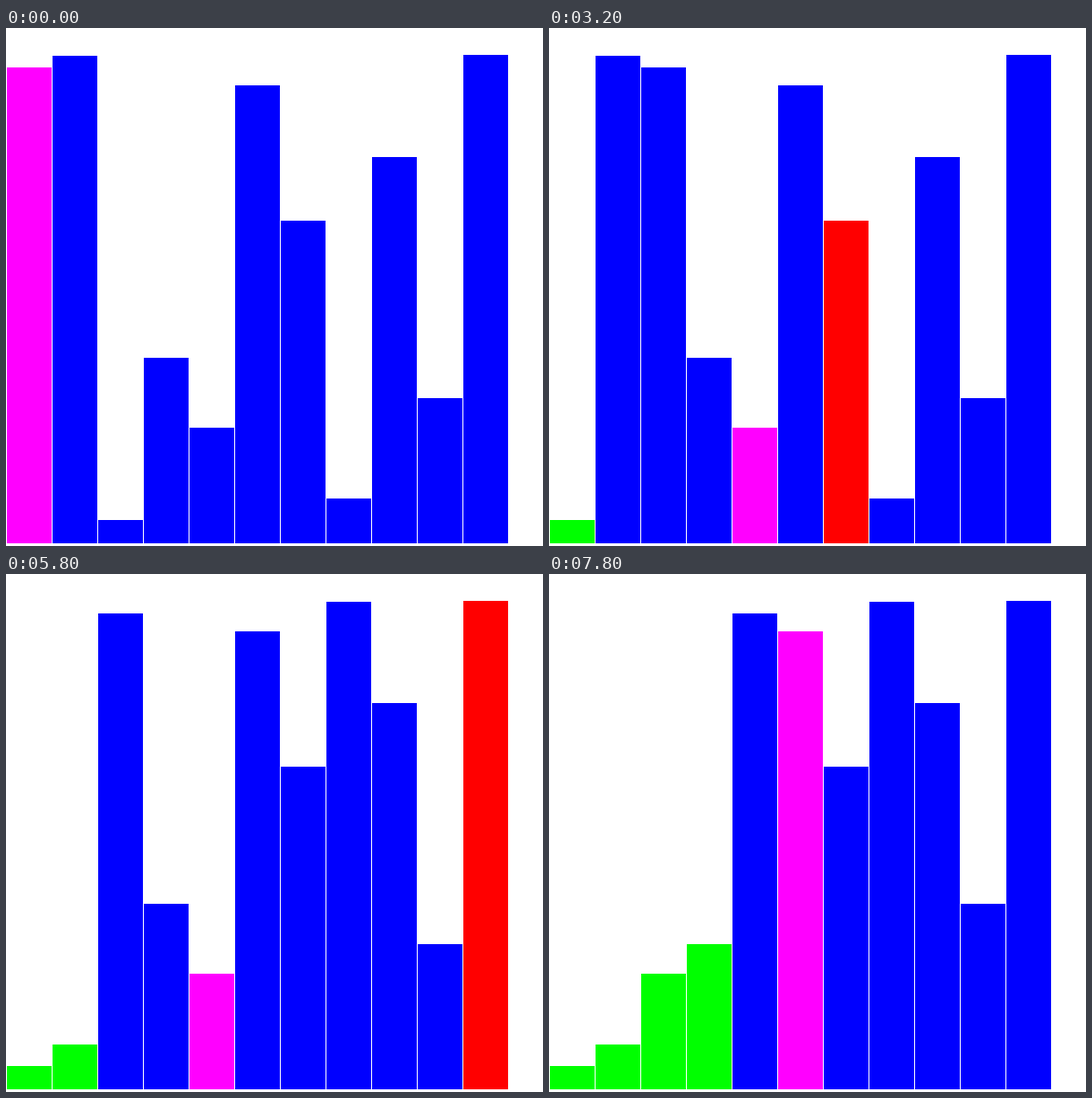
These frames come from a looping animation (600 by 578 pixels, 8000 ms). An HTML page with a canvas:

```html
<!DOCTYPE html>
<html lang="en">
<head>
<meta charset="utf-8">
<title>Selection sort</title>
<style>
  html, body { margin: 0; width: 100%; height: 100%; overflow: hidden; background: #fff; }
  canvas { display: block; }
</style>
</head>
<body>
<canvas id="stage" width="600" height="578"></canvas>
<script>
const ctx = document.getElementById('stage').getContext('2d');
const STEP_MS = 200, STEPS = 40;
const BASELINE = 575, BAR_WIDTH = 50, PITCH = 51;
const COLORS = { rest: '#00f', sorted: '#0f0', scan: '#f00', min: '#f0f' };
const heights = [531, 544, 26, 207, 129, 511, 360, 50, 431, 162, 545];

// One state per comparison of a selection sort.
function* selectionSort(source) {
  const bars = [...source];
  for (let sorted = 0; sorted < bars.length; sorted++) {
    let min = sorted;
    for (let scan = sorted; scan < bars.length; scan++) {
      if (bars[scan] < bars[min]) min = scan;
      yield { bars: [...bars], sorted, scan, min };
    }
    [bars[sorted], bars[min]] = [bars[min], bars[sorted]];
  }
}

const states = [...selectionSort(heights)].slice(0, STEPS);

function barColor(i, { sorted, scan, min }) {
  if (i === min) return COLORS.min;
  if (i === scan) return COLORS.scan;
  return i < sorted ? COLORS.sorted : COLORS.rest;
}

function draw(state) {
  ctx.fillStyle = '#fff';
  ctx.fillRect(0, 0, 600, 578);
  state.bars.forEach((height, i) => {
    ctx.fillStyle = barColor(i, state);
    ctx.fillRect(1 + i * PITCH, BASELINE - height, BAR_WIDTH, height);
  });
}

const start = performance.now();
function tick() {
  const elapsed = performance.now() - start;
  draw(states[Math.floor(elapsed / STEP_MS) % STEPS]);
  requestAnimationFrame(tick);
}
tick();
</script>
</body>
</html>
```
